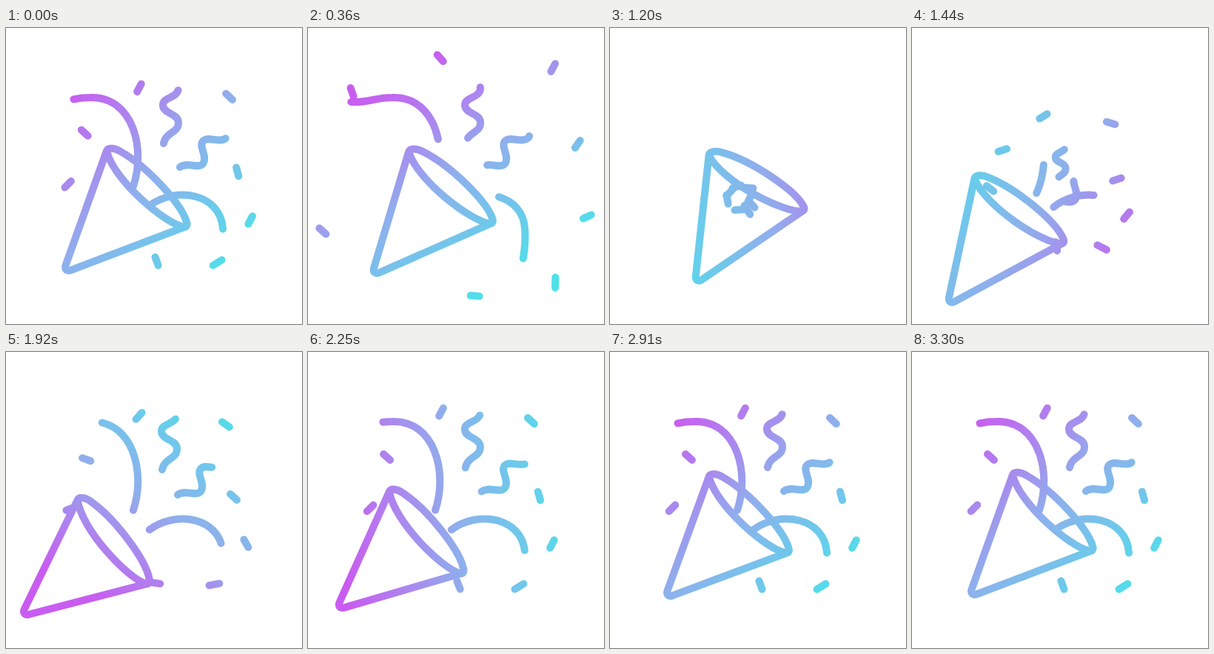
Write an HTML page without scripts that moves like this. It is 400 px wide and 400 px high and loops after 5330 ms.

```html
<!DOCTYPE html>
<html lang="en">
<head>
<meta charset="utf-8">
<title>Party popper</title>
<style>
html, body { margin: 0; width: 100%; height: 100%; overflow: hidden; background: #fff; }
svg { display: block; width: 100vw; height: 100vh; }
.ink { fill: none; stroke: #fff; stroke-width: 10; stroke-linecap: round; stroke-linejoin: round; }
.ink *, .tint { animation: 5330ms linear infinite; }

/* colour sweep */
.tint { transform-origin: 200px 200px; animation-name: spin; }
@keyframes spin {
  0% { transform: rotate(45deg); animation-timing-function: cubic-bezier(.37, 0, .63, 1); }
  56.3%, 100% { transform: rotate(405deg); }
}

/* cone: wind up, recoil, settle */
.ink .shift { animation-name: shift; }
@keyframes shift {
  0% { transform: translate(0, 0); }
  15.2% { transform: translate(0, 2px); }
  22% { transform: translate(0, 3px); animation-timing-function: ease-in; }
  24.4% { transform: translate(-42px, 33px); animation-timing-function: ease-out; }
  27% { transform: translate(-52px, 37px); }
  30.4% { transform: translate(-51px, 38px); }
  36% { transform: translate(-39px, 34px); }
  40.5% { transform: translate(-30px, 26px); }
  48.4% { transform: translate(-11px, 11px); animation-timing-function: cubic-bezier(.2, .5, .5, 1); }
  60.8%, 100% { transform: translate(0, 0); }
}
.ink .tilt { transform-origin: 139px 163px; animation-name: tilt; animation-timing-function: cubic-bezier(.37, 0, .63, 1); }
@keyframes tilt {
  0% { transform: rotate(0); }
  21.5%, 22.5% { transform: rotate(-13.5deg); }
  34.8% { transform: rotate(6.3deg); animation-timing-function: cubic-bezier(.35, 0, .4, 1); }
  60%, 100% { transform: rotate(0); }
}

/* confetti: --d out, --k share of it covered early, --r / --q turns out and in */
.ink .bit { --k: .69; animation-name: fly, gone; animation-timing-function: linear, step-end; }
.ink .early { --k: .75; animation-name: fly, goneEarly; }
@keyframes fly {
  0% {
    translate: var(--x) var(--y); rotate: var(--a);
    animation-timing-function: cubic-bezier(.3, .5, .6, .88);
  }
  6.75% {
    translate: calc(var(--x) + var(--dx) * var(--k)) calc(var(--y) + var(--dy) * var(--k));
    rotate: calc(var(--a) + var(--r1));
    animation-timing-function: cubic-bezier(.3, .4, .6, .95);
  }
  15.2% {
    translate: calc(var(--x) + var(--dx)) calc(var(--y) + var(--dy));
    rotate: calc(var(--a) + var(--r2));
  }
  20.8% {
    translate: calc(var(--x) + var(--dx) * 1.02) calc(var(--y) + var(--dy) * 1.02);
    rotate: calc(var(--a) + var(--r2) * 1.05);
  }
  21.95% {
    translate: 170px 235px; rotate: calc(var(--a) + var(--q1) * 1.6);
    animation-timing-function: cubic-bezier(.25, .4, .6, .88);
  }
  27.02% {
    translate: calc(var(--x) + (170px - var(--x)) * .25) calc(var(--y) + (235px - var(--y)) * .25);
    rotate: calc(var(--a) + var(--q1));
    animation-timing-function: cubic-bezier(.25, .4, .6, .92);
  }
  36.02% {
    translate: calc(var(--x) + (170px - var(--x)) * .035) calc(var(--y) + (235px - var(--y)) * .035);
    rotate: calc(var(--a) + var(--q2));
    animation-timing-function: ease-out;
  }
  43%, 100% { translate: var(--x) var(--y); rotate: var(--a); }
}
@keyframes gone { 0% { opacity: 1; } 20.9% { opacity: 0; } 22.5%, 100% { opacity: 1; } }
@keyframes goneEarly { 0% { opacity: 1; } 19.6% { opacity: 0; } 22.5%, 100% { opacity: 1; } }

/* streamers: --s offset and --l length of the visible run, --n whole path */
.ink .run { animation-name: trim, blink; animation-timing-function: linear, step-end; }
@keyframes trim {
  0% { stroke-dasharray: var(--l0) 400; stroke-dashoffset: var(--s0); }
  6.75% { stroke-dasharray: var(--l1) 400; stroke-dashoffset: var(--s1); }
  15.2% { stroke-dasharray: var(--l2) 400; stroke-dashoffset: var(--s2); }
  18.8% { stroke-dasharray: 0 400; stroke-dashoffset: var(--n); }
  23% { stroke-dasharray: 0 400; stroke-dashoffset: 0; }
  27.02% { stroke-dasharray: var(--l3) 400; stroke-dashoffset: var(--s3); }
  36.02% {
    stroke-dasharray: var(--l4) 400; stroke-dashoffset: var(--s0);
    animation-timing-function: cubic-bezier(.15, .6, .5, 1);
  }
  52%, 100% { stroke-dasharray: var(--l0) 400; stroke-dashoffset: var(--s0); }
}
@keyframes blink { 0% { opacity: 1; } 18.8% { opacity: 0; } 23.2%, 100% { opacity: 1; } }

.ink .grow { animation-name: grow; }
@keyframes grow {
  0%, 22.9% { transform: translate(0, 0) scale(1); stroke-width: 10; }
  23% { transform: translate(96px, 176px) scale(.4); stroke-width: 25; }
  27.02% {
    transform: translate(56px, 107px) scale(.65); stroke-width: 15.4;
    animation-timing-function: cubic-bezier(.25, .4, .6, .95);
  }
  36.02% { transform: translate(-2px, 3px) scale(1); stroke-width: 10; }
  43%, 100% { transform: translate(0, 0) scale(1); stroke-width: 10; }
}
.ink .slide { animation-name: slide; }
@keyframes slide {
  0%, 22.9% { transform: translate(0, 0); }
  23% { transform: translate(-75px, 80px); }
  27.02% { transform: translate(-46px, 49px); animation-timing-function: cubic-bezier(.25, .4, .6, .95); }
  36.02% { transform: translate(-3px, 5px); }
  43%, 100% { transform: translate(0, 0); }
}
</style>
</head>
<body>
<svg viewBox="0 0 400 400">
  <defs>
    <linearGradient id="hue" gradientUnits="userSpaceOnUse" x1="40" y1="0" x2="360" y2="0">
      <stop offset="0" stop-color="#c95cf0"/>
      <stop offset=".5" stop-color="#8eb0ec"/>
      <stop offset="1" stop-color="#4fe0ea"/>
    </linearGradient>
    <mask id="art" maskUnits="userSpaceOnUse" x="0" y="0" width="400" height="400">
      <g class="ink">
        <g class="shift">
          <path class="tilt" d="M136 166L80.5 321C79 326 82 329 87 327.500L241 269C215 265 145 205 136 166C138 161 147 162 155 167C192 188 237 238 244 262C245.500 266 244 269 241 269"/>
        </g>

        <path class="run" pathLength="316" style="--n:-316;--s0:-13;--l0:176;--s1:-76;--l1:146;--s2:-246;--l2:70;--s3:-3;--l3:39;--l4:138"
          d="M167 226C192 175 176 92 114 94C90 94 82 101 60 100C40 99 28 85 28 70C28 52 38 37 56 38"/>
        <path class="run" pathLength="257" style="--n:-257;--s0:-6;--l0:125;--s1:-72;--l1:98;--s2:-232;--l2:25;--s3:-3;--l3:57;--l4:112"
          d="M189 244C225 212 290 222 293 271C294 285 293 298 291 310C285 340 250 290 237 311C232 319 233 327 236 335"/>
        <g class="grow">
          <path class="run" pathLength="131" style="--n:-131;--s0:0;--l0:102;--s1:-8;--l1:98;--s2:-63;--l2:68;--s3:-13;--l3:84;--l4:98"
            d="M213 156C216 140 234 142 233 127C232 115 212 116 212 104C212 93 232 95 233 82C232 71 222 73 213 68"/>
        </g>
        <g class="slide">
          <path class="run" pathLength="128" style="--n:-128;--s0:0;--l0:102;--s1:-8;--l1:98;--s2:-66;--l2:62;--s3:-18;--l3:44;--l4:85"
            d="M235 188C246 180 262 192 267 182C272 172 260 160 266 153C272 145 290 157 298 148C303 140 295 135 296 126"/>
        </g>

        <path class="bit" d="M-6 0H6" style="--k:.65;--x:180px;--y:81px;--a:118deg;--dx:-2px;--dy:-62px;--r1:-70deg;--r2:-66deg;--q1:30deg;--q2:14deg"/>
        <path class="bit" d="M-6 0H6" style="--k:.57;--x:301.5px;--y:93px;--a:43deg;--dx:52px;--dy:-69px;--r1:75deg;--r2:102deg;--q1:-26deg;--q2:-8deg"/>
        <path class="bit early" d="M-6 0H6" style="--x:312.5px;--y:194.5px;--a:75deg;--dx:69px;--dy:-50px;--r1:49deg;--r2:156deg;--q1:-93deg;--q2:-33deg"/>
        <path class="bit early" d="M-6 0H6" style="--x:330px;--y:259.5px;--a:118deg;--dx:63px;--dy:-6px;--r1:37deg;--r2:102deg;--q1:-168deg;--q2:-58deg"/>
        <path class="bit" d="M-7 0H7" style="--x:285.5px;--y:317px;--a:148deg;--dx:70.5px;--dy:39px;--r1:-56deg;--r2:-180deg;--q1:59deg;--q2:22deg"/>
        <path class="bit" d="M-6 0H6" style="--x:203.5px;--y:315px;--a:70deg;--dx:32px;--dy:68px;--r1:-66deg;--r2:-155deg;--q1:-170deg;--q2:-62deg"/>
        <path class="bit" d="M-6 0H6" style="--x:106.5px;--y:142px;--a:42deg;--dx:-68px;--dy:-80px;--r1:28deg;--r2:98deg;--q1:-60deg;--q2:-22deg"/>
        <path class="bit" d="M-6 0H6" style="--x:84px;--y:211px;--a:135deg;--dx:-93px;--dy:92px;--r1:-93deg;--r2:-150deg;--q1:83deg;--q2:25deg"/>
      </g>
    </mask>
  </defs>
  <g mask="url(#art)">
    <rect class="tint" x="-200" y="-200" width="800" height="800" fill="url(#hue)"/>
  </g>
</svg>
</body>
</html>
```
